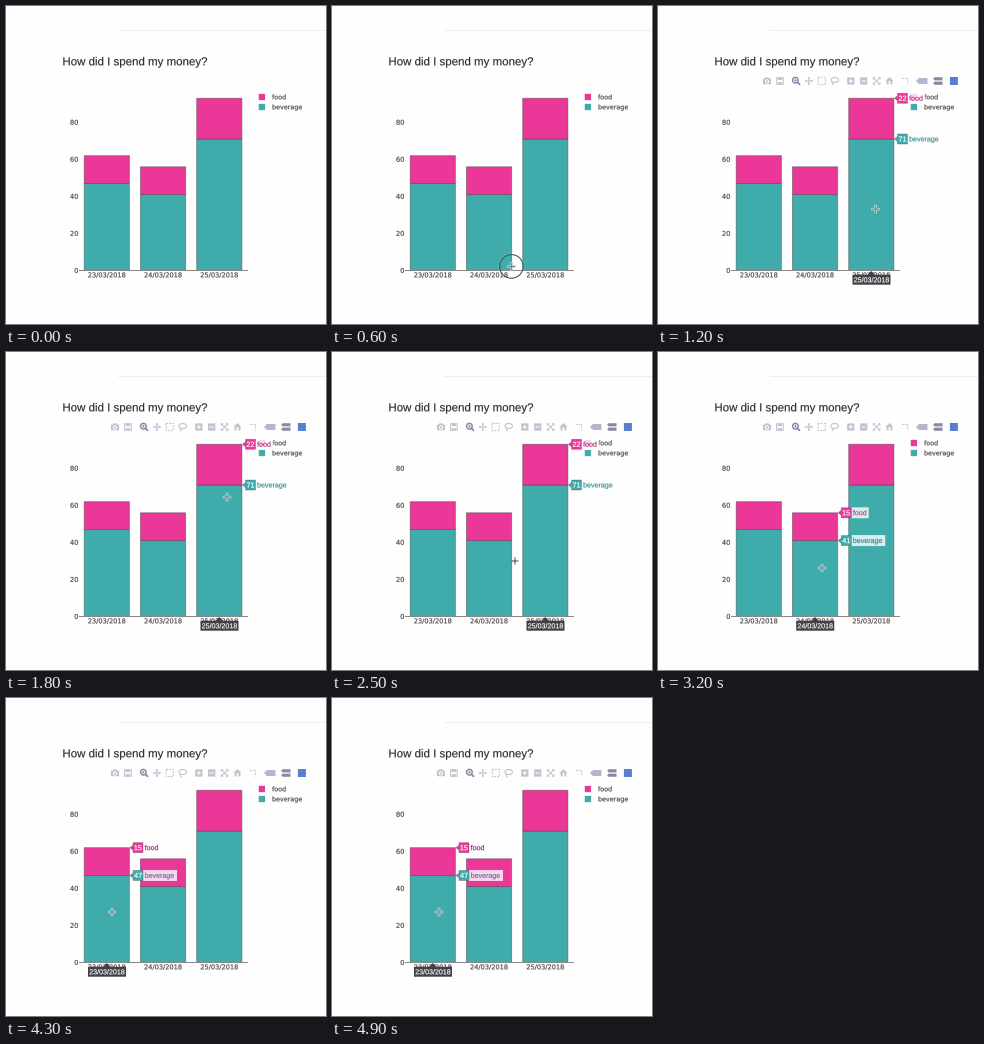
Write a matplotlib script that moves like this. It is 320 px wide and 318 px high and loops after 5.1 s.

```python
import numpy as np
import matplotlib.pyplot as plt
from matplotlib.animation import FuncAnimation
from matplotlib.patches import Circle, PathPatch, Polygon, Rectangle
from matplotlib.textpath import TextPath
from matplotlib.transforms import Affine2D

plt.rcParams["path.snap"] = False

W, H, DPI = 320, 318, 100
FRAMES, STEP = 51, 100
PX = 72 / DPI

TEAL, PINK = "#3fabab", "#eb3797"
INK, DARK, PALE, MID = "#444444", "#3f4146", "#c0c3cf", "#858ba3"
SANS, WIDE = "Liberation Sans", "DejaVu Sans"
BASE, UNIT = 264.5, 1.852
BAR_W, PITCH = 45.2, 56.25
DAYS = [(47, 15, "23/03/2018"), (41, 15, "24/03/2018"), (71, 22, "25/03/2018")]
CENTERS = 100.8 + PITCH * np.arange(3)

fig = plt.figure(figsize=(W / DPI, H / DPI), dpi=DPI, facecolor="#fefefe")
ax = fig.add_axes([0, 0, 1, 1])
ax.set_xlim(0, W)
ax.set_ylim(H, 0)
ax.axis("off")


def box(cx, cy, w, h, color, z=1, **kw):
    return ax.add_patch(Rectangle((cx - w / 2, cy - h / 2), w, h, fc=color,
                                  lw=0, zorder=z, **kw))


def poly(pts, fill="none", edge="none", lw=0.0, z=1, **kw):
    return ax.add_patch(Polygon(pts, fc=fill, ec=edge, lw=lw * PX, zorder=z,
                                **kw))


def line(xs, ys, color, lw=1.0, z=1, **kw):
    return ax.plot(xs, ys, color=color, lw=lw * PX, zorder=z,
                   solid_capstyle="butt", **kw)[0]


def ring(x, y, r, color, lw=1.0, z=1, **kw):
    return ax.add_patch(Circle((x, y), r, fc="none", ec=color, lw=lw * PX,
                               zorder=z, **kw))


def label(x, y, s, size, color=INK, font=WIDE, align=0.0, z=2):
    """Text on baseline y; align 0, 0.5 or 1 is left, centre or right."""
    path = TextPath((0, 0), s, size=size, prop={"family": font})
    box_x = path.get_extents()
    shift = x - align * (box_x.x0 + box_x.x1)
    if align == 1:
        shift = x - box_x.x1
    path = path.transformed(Affine2D().scale(1, -1).translate(shift, y))
    return ax.add_patch(PathPatch(path, fc=color, ec=color, lw=0.15 * PX,
                                  zorder=z))


def value_y(v):
    return BASE - UNIT * v


def draw_chart():
    line([112, W], [24.5, 24.5], "#eeeeee")
    label(56.4, 59.3, "How did I spend my money?", 11.5, "#2b2b2b", SANS)
    for v in range(0, 81, 20):
        label(72, value_y(v) + 2.4, str(v), 6.7, align=1)
    for x, (drink, food, day) in zip(CENTERS, DAYS):
        for low, size, color in ((0, drink, TEAL), (drink, food, PINK)):
            ax.add_patch(Rectangle((x - BAR_W / 2, value_y(low)), BAR_W,
                                   -UNIT * size, fc=color, lw=0))
            ax.add_patch(Rectangle((x - BAR_W / 2, value_y(low)), BAR_W,
                                   -UNIT * size, fc="none", ec=INK,
                                   lw=0.9 * PX, alpha=0.5))
        label(x, 271.3, day, 6.6, align=0.5)
    line([73, 242], [BASE, BASE], "#888888")
    for y, color, name in ((91, PINK, "food"), (101, TEAL, "beverage")):
        box(255.9, y, 6.3, 6.3, color)
        label(266, y + 2.3, name, 6.4)


def plus(x, y, r, color, lw=1.1):
    return [line([x - r, x + r], [y, y], color, lw),
            line([x, x], [y - r, y + r], color, lw)]


def square(x, y, r, **kw):
    return poly([(x - r, y - r), (x + r, y - r), (x + r, y + r),
                 (x - r, y + r)], edge=PALE, lw=1.1, **kw)


def tag(x, y, w, h, color):
    left = x - w / 2
    return poly([(left, y), (left + h / 2, y - h / 2), (x + w / 2, y - h / 2),
                 (x + w / 2, y + h / 2), (left + h / 2, y + h / 2)], color)


def camera(x, y):
    return [box(x, y + 0.4, 8, 5.6, PALE), box(x, y - 2.8, 4, 1.6, PALE),
            ring(x, y + 0.4, 1.6, "white")]


def disk(x, y):
    return [square(x, y, 3.3), box(x, y - 2, 4, 2.2, PALE),
            box(x, y + 2, 4, 1.8, PALE)]


def magnifier(x, y):
    return [ring(x - 0.6, y - 0.8, 2.8, MID, 1.5),
            line([x + 1.3, x + 4], [y + 1.1, y + 3.8], MID, 1.8)] \
        + plus(x - 0.6, y - 0.8, 1.4, MID, 0.8)


def pan(x, y):
    tips = [poly([(x + 4.2 * c, y + 4.2 * s),
                  (x + 2.4 * c - 1.5 * s, y + 2.4 * s + 1.5 * c),
                  (x + 2.4 * c + 1.5 * s, y + 2.4 * s - 1.5 * c)], PALE)
            for c, s in ((1, 0), (-1, 0), (0, 1), (0, -1))]
    return tips + plus(x, y, 3.5, PALE)


def marquee(x, y):
    return [square(x, y, 3.6, ls=(0, (1.6, 1.1)))]


def lasso(x, y):
    a = np.linspace(0, 2 * np.pi, 20)
    loop = np.column_stack([x + 3.8 * np.cos(a), y - 1 + 2.5 * np.sin(a)])
    return [poly(loop, edge=PALE, lw=1.1),
            line([x - 2, x - 2.6, x - 1], [y + 1, y + 2.6, y + 4], PALE)]


def zoom_in(x, y):
    return [box(x, y, 7.2, 7.2, PALE)] + plus(x, y, 2, "white")


def zoom_out(x, y):
    return [box(x, y, 7.2, 7.2, PALE), line([x - 2, x + 2], [y, y], "white")]


def autoscale(x, y):
    rays = [(sx, sy) for sx in (-1, 1) for sy in (-1, 1)]
    return [line([x, x + 3 * sx], [y, y + 3 * sy], PALE) for sx, sy in rays] \
        + [poly([(x + 3.8 * sx, y + 3.8 * sy), (x + sx, y + 3.8 * sy),
                 (x + 3.8 * sx, y + sy)], PALE) for sx, sy in rays]


def home(x, y):
    return [poly([(x - 4, y), (x, y - 4), (x + 4, y)], PALE),
            box(x - 1.9, y + 1.6, 2, 3.6, PALE),
            box(x + 1.9, y + 1.6, 2, 3.6, PALE)]


def spikes(x, y):
    return [line([x - 3.5, x + 2, x + 2], [y - 2.6, y - 2.6, y + 3.6], PALE,
                 ls=(0, (1.8, 1)))]


def closest(x, y):
    return [tag(x, y, 11.5, 6, "#b3b6d2")]


def compare(x, y):
    return [tag(x, y + d, 9.4, 3.2, MID) for d in (-2.2, 2.2)]


def badge(x, y):
    return [box(x, y, 8, 8, "#5b7fd0")]


def draw_toolbar():
    groups = [[camera, disk], [magnifier, pan, marquee, lasso],
              [zoom_in, zoom_out, autoscale, home],
              [spikes], [closest], [compare], [badge]]
    x, parts = 109.0, []
    for group in groups:
        for icon in group:
            parts += icon(x, 75)
            x += 12.9
        x += 3.2
    return parts


def draw_hover(x, day, inks):
    drink, food, date = day
    tip = x + BAR_W / 2 + 0.6
    parts = []
    rows = ((drink + food, food, "food", PINK, 17.5),
            (drink, drink, "beverage", TEAL, 34))
    for (top, n, name, color, width), ink in zip(rows, inks):
        y = value_y(top)
        shape = [(tip, y)] + [(tip + dx, y + dy) for dx, dy in (
            (3, -2.5), (3, -5), (13, -5), (13, 5), (3, 5), (3, 2.5))]
        parts += [
            box(tip + 13 + width / 2, y, width, 11, "white", 4, alpha=0.8),
            poly(shape, color, z=5),
            poly(shape, edge=INK, lw=0.6, z=5, alpha=0.5),
            label(tip + 8, y + 2.5, str(n), 7.3, "white", SANS, 0.5, 6),
            label(tip + 14.6, y + 2.4, name, 7.1, ink, SANS, z=6),
        ]
    parts += [
        box(x + 0.2, 273.7, 38, 10, DARK, 5),
        poly([(x, 265), (x + 4, 269), (x - 4, 269)], DARK, z=5),
        label(x + 0.2, 276.3, date, 7.1, "white", SANS, 0.5, 6),
    ]
    return parts


draw_chart()
toolbar = draw_toolbar()
INKS = [("#7c2a72", "#6270a6"), ("#c23a86", "#37868c"),
        ("#b02a78", "#2f9494")]
hovers = [draw_hover(*args) for args in zip(CENTERS, DAYS, INKS)]

halo = [ring(0, 0, 12.6, "white", 0.8, 9, alpha=0.25),
        ring(0, 0, 11.8, "#355c60", 1.1, 9)]
angles = np.arange(4) * np.pi / 2
ARM, HALF = 3.9, 0.9
PLUS = np.array([(np.cos(a) * u - np.sin(a) * v, np.sin(a) * u + np.cos(a) * v)
                 for a in angles
                 for u, v in ((ARM, -HALF), (ARM, HALF), (HALF, HALF))])
cross = poly(PLUS, "#5d9094", "#c3d9da", 0.75, 10)
thin = plus(0, 0, 3.5, INK, 1)

# pointer path: step, x, y
PATH = np.array([(4, 157, 202), (6.5, 185, 275), (9, 215, 246),
                 (16, 221, 146), (18, 221, 145), (25, 183, 209),
                 (30, 164, 216), (35, 164, 216), (40, 154, 215),
                 (43, 106, 214), (49, 107, 214)])


def pointer(i):
    return [np.interp(i, PATH[:, 0], PATH[:, k]) for k in (1, 2)]


def update(i):
    x, y = pointer(i)
    shown = i >= 4
    on_bar = np.abs(CENTERS - x).min() < BAR_W / 2 and y < BASE

    for circle in halo:
        circle.set_center((x, y))
        circle.set_visible(4 <= i <= 9)
    cross.set_xy(PLUS + (x, y))
    cross.set_visible(shown and on_bar)
    thin[0].set_data([x - 3.5, x + 3.5], [y, y])
    thin[1].set_data([x, x], [y - 3.5, y + 3.5])
    for part in thin:
        part.set_visible(shown and not on_bar)

    fade = np.interp(i, [9, 12], [0, 1])
    for part in toolbar:
        part.set_alpha(fade)

    # the hover label trails the pointer by one step
    nearest = np.abs(CENTERS - pointer(i - 1)[0]).argmin()
    for k, parts in enumerate(hovers):
        for part in parts:
            part.set_visible(i >= 10 and k == nearest)
    return []


anim = FuncAnimation(fig, update, frames=FRAMES, interval=STEP,
                     init_func=lambda: update(0), repeat=True, repeat_delay=0,
                     blit=False)
plt.show()
```
